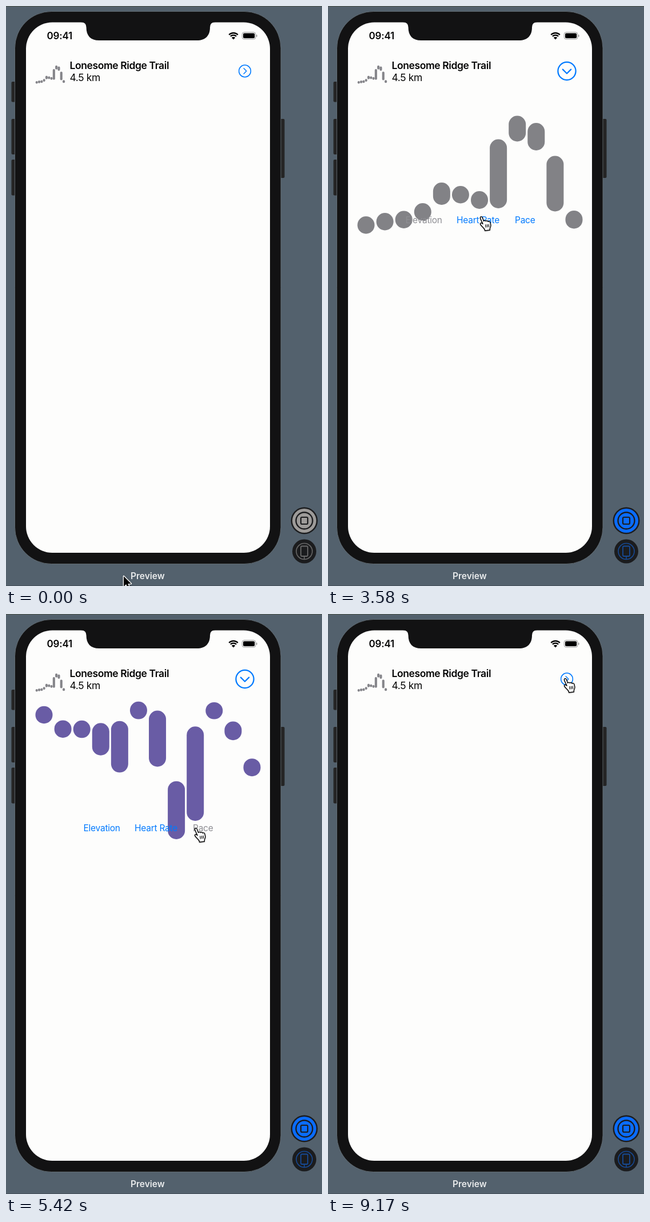
An HTML page with a canvas for the animation above (9.21 s loop, 553x1012 px).

```html
<!DOCTYPE html>
<html lang="en">
<head>
<meta charset="utf-8">
<title>Hike preview</title>
<style>
html, body { margin: 0; width: 100%; height: 100%; overflow: hidden; background: #53616d; }
canvas { display: block; width: 553px; height: 1012px; }
</style>
</head>
<body>
<canvas id="stage"></canvas>
<script>
const W = 553, H = 1012, LOOP = 9210;
const canvas = document.getElementById('stage');
const ctx = canvas.getContext('2d');
const dpr = window.devicePixelRatio || 1;
canvas.width = W * dpr;
canvas.height = H * dpr;

const BLUE = '#007aff', GRAY = '#8e8e93', INK = '#121213';
const FONT = 'Inter, "Liberation Sans", sans-serif';

// Moments of the clicks, in ms
const LIVE = 1350, OPEN = 1985, HEART = 3790, PACE = 5037, CLOSE = 6505, FADE = 350;

// Top and bottom of each capsule
const elevation = [[367, 397.5], [361, 391.5], [357.5, 388], [344, 374.5], [308, 347], [314, 344.5],
  [323, 354], [232.5, 353], [191.5, 236.5], [204, 252], [261.5, 358.5], [357, 388.5]];
const heart = [[380, 411], [378, 409], [362, 392.5], [346, 383], [313, 353.7], [320, 350.7],
  [346.3, 377.3], [254.6, 350.5], [204.6, 266], [263.2, 335.5], [312.2, 348.6], [332.9, 364]];
const pace = [[158.5, 189], [181.5, 212], [181, 211.5], [186.7, 243.6], [186.7, 276.6], [160, 190.8],
  [176.5, 268], [282.2, 382.8], [181.6, 332.5], [159.3, 191], [159.3, 191], [160, 191]];
const kick = { 6: 16, 7: 7, 8: 21 };

const sets = [
  { at: 0, bars: elevation, color: '#828286', label: 'Elevation', x: 135.5 },
  { at: HEART, bars: heart, color: '#a74c49', label: 'Heart Rate', x: 225 },
  { at: PACE, bars: pace, color: '#695ca5', label: 'Pace', x: 327 }
];

// Cursor stops: time, x, y
const arrowPath = [[850, 206, 995], [1270, 523, 899], [1450, 523, 899]];
const handPath = [[1450, 518, 898], [1880, 411, 113], [2400, 411, 113], [3250, 265, 367], [3850, 265, 367],
  [4250, 302, 386], [4800, 329, 373], [5600, 329, 373], [6300, 412, 112]];

const handShape = new Path2D('M1.6 3.6C.6.4 4.2-.4 5.2 2.2L7.6 8.4C8.4 7 10.6 7 11.3 8.5' +
  'C12.4 7.1 14.5 7.5 15 9.2C16.4 8.2 18.6 9 18.9 10.8L19.8 15C20.3 18 18.5 19.2 18.3 21.5' +
  'V24L9.6 25L9 22.5C7 19.5 4 17.5 2 14.5C.4 12 3 10.4 5 12.4L6 13.2Z');
const handLines = new Path2D('M10.7 14.5L11.3 19M13.5 14.3L14 18.7M16.2 14L16.6 18.2');
const arrowShape = new Path2D('M0 0V18L4.2 14.1L7 20.6L10 19.2L7.3 13H13Z');

const clamp = v => Math.min(1, Math.max(0, v));
const mix = (a, b, p) => a + (b - a) * p;
const smooth = p => p * p * (3 - 2 * p);

// Cubic easing (.42, 0, .58, 1)
function ease(x) {
  x = clamp(x);
  let lo = 0, hi = 1, u = x;
  for (let i = 0; i < 20; i++) {
    u = (lo + hi) / 2;
    const v = 1.26 * u * (1 - u) * (1 - u) + 1.74 * u * u * (1 - u) + u * u * u;
    if (v < x) lo = u; else hi = u;
  }
  return smooth(u);
}

// Remaining distance of a spring with damping 0.5
function spring(s) {
  if (s <= 0) return 1;
  return Math.exp(-11.4 * s) * (Math.cos(19.8 * s) + 0.577 * Math.sin(19.8 * s));
}

function along(stops, t) {
  if (t <= stops[0][0]) return stops[0].slice(1);
  for (let i = 1; i < stops.length; i++) {
    const [t1, x1, y1] = stops[i], [t0, x0, y0] = stops[i - 1];
    if (t < t1) {
      const p = smooth((t - t0) / (t1 - t0));
      return [mix(x0, x1, p), mix(y0, y1, p)];
    }
  }
  return stops[stops.length - 1].slice(1);
}

// Opacity of a button around its click
function pressed(t, click) {
  const d = t - click;
  if (d < -110) return 1;
  return d < 0 ? 0.35 : Math.min(1, 0.35 + 0.65 * d / 250);
}

function box(x, y, w, h, r, fill) {
  ctx.beginPath();
  ctx.roundRect(x, y, w, h, r);
  if (fill) {
    ctx.fillStyle = fill;
    ctx.fill();
  }
}

function disc(x, y, r, fill) {
  ctx.beginPath();
  ctx.arc(x, y, r, 0, 7);
  ctx.fillStyle = fill;
  ctx.fill();
}

function outline(color, width) {
  ctx.strokeStyle = color;
  ctx.lineWidth = width;
  ctx.stroke();
}

function text(str, x, y, size, weight, color, spacing = 0) {
  ctx.font = `${weight} ${size}px ${FONT}`;
  ctx.letterSpacing = spacing + 'px';
  ctx.fillStyle = color;
  ctx.fillText(str, x, y);
}

function drawPhone() {
  ctx.fillStyle = '#53616d';
  ctx.fillRect(0, 0, W, H);
  ctx.fillStyle = '#485049';
  ctx.fillRect(0, 0, W, 1);
  ctx.fillStyle = '#454f5a';
  ctx.fillRect(0, H - 1, W, 1);
  for (const [x, y, h] of [[9.5, 132, 35.5], [9.5, 197, 62], [9.5, 268, 62.5], [479.5, 197, 103]]) {
    box(x, y, 8, h, 2, '#252525');
  }
  box(15.5, 9.5, 465.5, 964, 64, INK);
  outline('#6d767d', 0.8);
  box(35, 28.5, 427, 925.5, 46, '#fdfdfc');
}

function drawStatus() {
  ctx.fillStyle = INK;
  ctx.beginPath();
  ctx.moveTo(131, 28);
  ctx.quadraticCurveTo(140.5, 28.5, 140.5, 37);
  ctx.bezierCurveTo(140.5, 52, 148, 60, 163, 60);
  ctx.lineTo(334, 60);
  ctx.bezierCurveTo(349, 60, 357, 52, 357, 37);
  ctx.quadraticCurveTo(357, 28.5, 366, 28);
  ctx.fill();
  text('09:41', 71.5, 58, 17, 600, '#050505', -0.2);

  ctx.save();
  ctx.lineCap = 'butt';
  for (const r of [11, 7.2]) {
    ctx.beginPath();
    ctx.arc(398, 58, r, -Math.PI * 0.75, -Math.PI * 0.25);
    outline('#000', 2.3);
  }
  ctx.beginPath();
  ctx.moveTo(398, 58.5);
  ctx.arc(398, 58.5, 4.6, -Math.PI * 0.75, -Math.PI * 0.25);
  ctx.fillStyle = '#000';
  ctx.fill();
  box(413.3, 45.8, 23.6, 12.2, 3.5);
  outline('#9a9a9a', 1);
  box(415, 47.5, 20.2, 8.8, 2, '#000');
  box(438, 50, 1.5, 4, 0.8, '#9a9a9a');
  ctx.restore();
}

function drawRow(t, shown) {
  elevation.forEach(([a, b], i) => {
    const top = 133.2 + (a - 382) * 0.155;
    box(51.7 + 4.3 * i, top, 4.1, (b - a) * 0.155, 2, '#85858a');
  });
  text('Lonesome Ridge Trail', 111.5, 109.5, 17.5, 600, '#050505', -0.4);
  text('4.5 km', 111.5, 130.5, 17.5, 400, '#050505', -0.4);

  ctx.save();
  ctx.globalAlpha = Math.min(pressed(t, OPEN), pressed(t, CLOSE));
  ctx.translate(418, 113.5);
  ctx.rotate(shown * Math.PI / 2);
  ctx.scale(1 + shown / 2, 1 + shown / 2);
  ctx.lineCap = ctx.lineJoin = 'round';
  ctx.beginPath();
  ctx.arc(0, 0, 10.4, 0, 7);
  outline(BLUE, 1.5);
  ctx.beginPath();
  ctx.moveTo(-1.9, -4.8);
  ctx.lineTo(2.8, 0);
  ctx.lineTo(-1.9, 4.8);
  ctx.stroke();
  ctx.restore();
}

function drawDetail(t) {
  if (t < OPEN || t >= CLOSE + FADE) return;
  const current = t < HEART ? 0 : t < PACE ? 1 : 2;
  const set = sets[current], before = sets[Math.max(0, current - 1)].bars;
  const enter = ease((t - OPEN) / FADE), leave = ease((t - CLOSE) / FADE);
  const alpha = enter * (1 - leave);

  ctx.save();
  box(35, 28.5, 427, 925.5, 46);
  ctx.clip();
  ctx.translate(248.5 + (1 - enter) * 418, 268);
  ctx.scale(1 - leave, 1 - leave);
  ctx.translate(-248.5, -268);
  ctx.globalAlpha = alpha;

  set.bars.forEach(([a, b], i) => {
    const s = Math.max(0, (t - set.at) / 1000 - 0.03 * i);
    const rest = current ? spring(s) : 0;
    const k = s / 0.088;
    const push = current === 2 ? (kick[i] || 0) * k * Math.exp(1 - k) : 0;
    const top = mix(a, before[i][0], rest) + push;
    const end = mix(b, before[i][1], rest) + push;
    const h = Math.max(1, end - top);
    box(51.5 + 33.09 * i, top, 30, h, Math.min(15, h / 2), set.color);
  });

  sets.forEach((s, i) => {
    ctx.globalAlpha = alpha * (i && i !== current ? pressed(t, s.at) : 1);
    text(s.label, s.x, 378.5, 15.5, 400, i === current ? GRAY : BLUE, -0.25);
  });
  ctx.restore();
}

function drawControls(t) {
  const live = t >= LIVE;
  const x = 522;
  disc(x, 898, 23.5, '#1c1d1f');
  disc(x, 898, 21, live ? '#0a6cff' : '#9d9b99');
  ctx.beginPath();
  ctx.arc(x, 898, 14.5, 0, 7);
  outline('#1c1d1f', 2.4);
  box(x - 6, 892, 12, 12, 2);
  outline('#1c1d1f', 2.2);

  const line = live ? '#174a95' : '#686868';
  disc(x, 951.5, 21, '#1b1c1e');
  ctx.beginPath();
  ctx.arc(x, 951.5, 14, 0, 7);
  outline(line, 1.6);
  box(x - 6, 942.5, 12, 17.5, 2, '#1b1c1e');
  outline(line, 1.8);
  ctx.beginPath();
  ctx.moveTo(x, 960);
  ctx.lineTo(x, 966);
  outline(line, 1.6);
  text('Preview', 218, 1000, 15.5, 600, '#e9ebec', 0);
}

function drawCursor(t) {
  const arrow = t < 1450;
  const [x, y] = along(arrow ? arrowPath : handPath, t);
  ctx.save();
  ctx.translate(x, y);
  ctx.lineJoin = ctx.lineCap = 'round';
  ctx.shadowColor = 'rgba(0,0,0,.35)';
  ctx.shadowBlur = 3 * dpr;
  ctx.shadowOffsetY = dpr;
  if (arrow) {
    outlineShape(arrowShape, '#fff', 2.6);
    ctx.shadowColor = 'transparent';
    ctx.fillStyle = '#000';
    ctx.fill(arrowShape);
  } else {
    ctx.fillStyle = '#fff';
    ctx.fill(handShape);
    ctx.shadowColor = 'transparent';
    outlineShape(handShape, '#000', 1.4);
    outlineShape(handLines, '#000', 1.2);
  }
  ctx.restore();
}

function outlineShape(path, color, width) {
  ctx.strokeStyle = color;
  ctx.lineWidth = width;
  ctx.stroke(path);
}

function draw(t) {
  const shown = ease((t - OPEN) / FADE) - ease((t - CLOSE) / FADE);
  ctx.setTransform(dpr, 0, 0, dpr, 0, 0);
  drawPhone();
  drawStatus();
  drawRow(t, shown);
  drawDetail(t);
  drawControls(t);
  drawCursor(t);
}

const start = performance.now();
function tick() {
  draw((performance.now() - start) % LOOP);
  requestAnimationFrame(tick);
}
tick();
</script>
</body>
</html>
```
